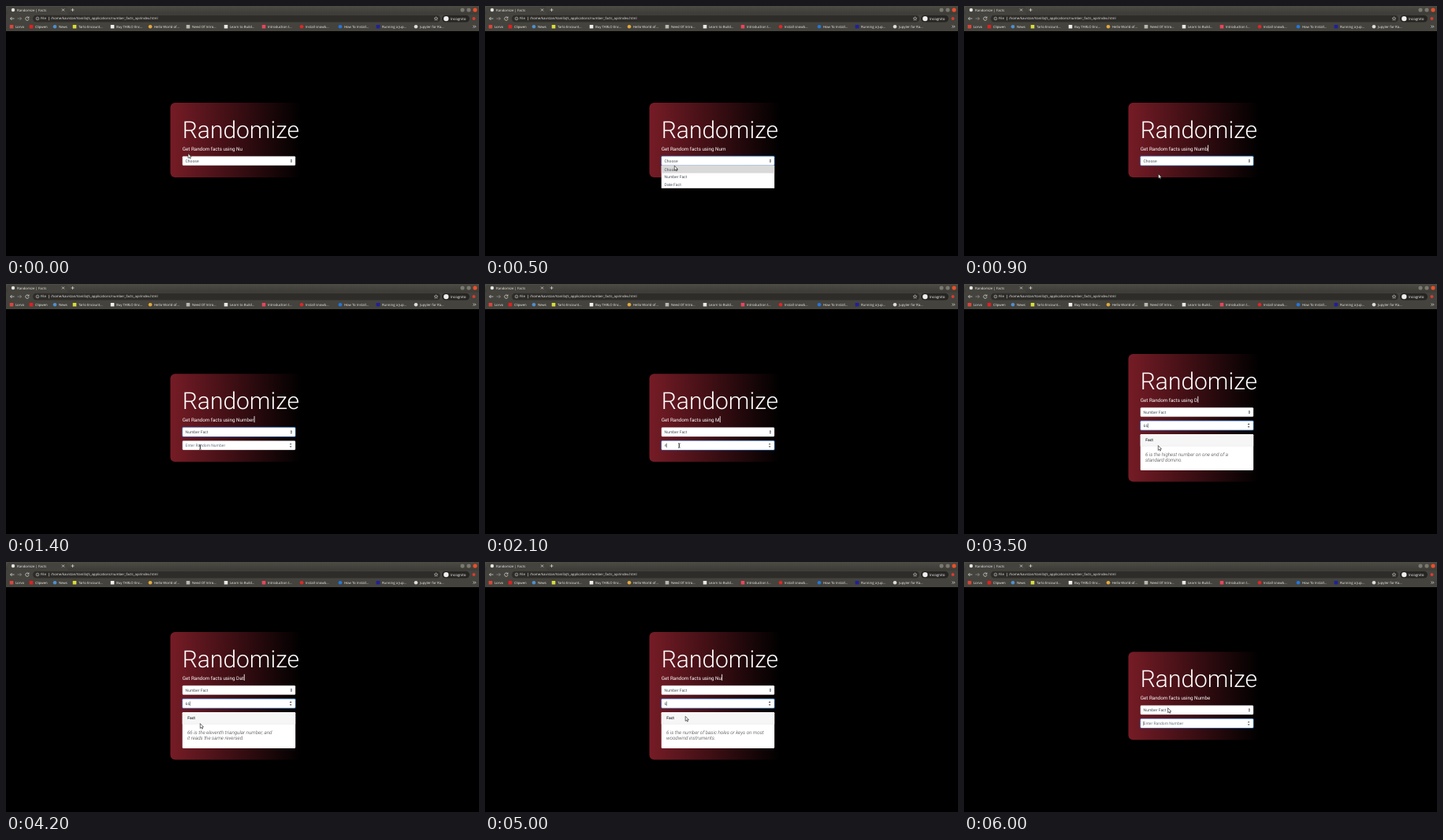
Animation, 600 px wide and 318 px high, one loop 6100 ms. Source, as an HTML page:

```html
<!DOCTYPE html>
<html lang="en">
<head>
<meta charset="utf-8">
<title>Randomize | Facts</title>
<style>
  html, body { margin: 0; width: 100%; height: 100%; overflow: hidden; background: #000; }
  svg { display: block; width: 600px; height: 318px; }
  text { white-space: pre; text-rendering: geometricPrecision; }
  #chrome text { font: 500 4.3px "Open Sans", sans-serif; fill: #efede8; }
  #page text { font: 5px Roboto, sans-serif; fill: #495057; }
  #page .title { font-size: 30px; font-weight: 300; fill: #fff; }
  #page .lead { font-size: 6.25px; fill: #fff; }
  #page .fact { font-size: 6.25px; font-weight: 300; font-style: italic; fill: #333; }
  #page .head { font-weight: 500; fill: #212529; }
  #page .hint { fill: #6c757d; }
  .field { fill: #fff; stroke: #ced4da; stroke-width: .3; }
  .focus .field { stroke: #80bdff; }
  .glow { fill: #007bff; opacity: 0; }
  .focus .glow { opacity: .3; }
  .line { fill: none; stroke: #e6e4de; stroke-width: .7; }
  .thin { stroke-width: .5; }
</style>
</head>
<body>
<svg viewBox="0 0 600 318">
  <defs>
    <linearGradient id="wine">
      <stop stop-color="#761c26"/>
      <stop offset="1"/>
    </linearGradient>
    <linearGradient id="bar" x2="0" y2="1">
      <stop stop-color="#4c4b44"/>
      <stop offset="1" stop-color="#3c3b36"/>
    </linearGradient>
  </defs>
  <rect width="600" height="318"/>

  <g id="chrome">
    <rect width="600" height="11" fill="url(#bar)"/>
    <path d="M0 10.500q2 0 2-2V3q0-2 2-2h72q2 0 2 2v5.500q0 2 2 2h520V32H0z" fill="#44433d"/>
    <circle cx="9" cy="5" r="2.200" fill="#e4e4e2"/>
    <text x="14" y="6.600">Randomize | Facts</text>
    <path class="line" d="M71 3.500l3 3m0-3l-3 3M82.500 5h4m-2-2v4"/>
    <g fill="#7b796f" stroke="#33322e" stroke-width=".5">
      <circle cx="579" cy="5" r="3"/>
      <circle cx="587" cy="5" r="3"/>
      <circle cx="595" cy="5" r="3" fill="#e5512f"/>
    </g>
    <path class="line" d="M10.500 16h-5m2-2l-2 2 2 2"/>
    <path class="line" d="M14.500 16h5m-2-2l2 2-2 2" opacity=".5"/>
    <path class="line" d="M28.600 14.700a2.200 2.200 0 1 0 .5 1.800M29 13.500v1.700h-1.700"/>
    <rect x="34" y="11.800" width="517" height="8.600" rx="4.300" fill="#2d2c29"/>
    <circle class="line thin" cx="40" cy="16" r="1.900"/>
    <path class="line thin" d="M40 15.800v1.200m0-2.200v.4M54.500 13.800v4.500"/>
    <text x="44" y="17.400">File</text>
    <text x="57" y="17.400">/home/kavistan/VanillaJS_applications/number_facts_api/index.html</text>
    <path class="line thin" d="M545.500 13.700l.7 1.600 1.700.1-1.300 1.100.4 1.700-1.500-.9-1.500.9.4-1.700-1.300-1.100 1.700-.1z"/>
    <rect x="553" y="11.800" width="35" height="8.600" rx="4.300" fill="#262522"/>
    <circle cx="558.300" cy="16.100" r="3.200" fill="#eee"/>
    <text x="564" y="17.700" style="font-size:4.500px;fill:#fff">Incognito</text>
    <circle cx="593.500" cy="16" r="2" fill="#d93a32"/>
    <path class="line" d="M592.500 24.700l1.500 1.500-1.500 1.500m2-3l1.500 1.500-1.500 1.500"/>
    <g id="marks"></g>
  </g>

  <g id="page">
    <g id="card">
      <rect id="panel" x="208.500" width="166" rx="6" fill="url(#wine)"/>
      <text class="title" x="223.750" y="45.200">Randomize</text>
      <text id="lead" class="lead" x="223.750" y="60.700"></text>
      <rect id="caret" y="53.800" width="1" height="8" fill="#ddd"/>

      <g id="select">
        <rect class="glow" x="222.800" y="67.100" width="145.300" height="13.700" rx="1.800"/>
        <rect class="field" x="223.900" y="68.150" width="143.100" height="11.600" rx="1.200"/>
        <text id="choice" x="227.600" y="75.800"></text>
        <path d="M360.700 73.500l1.200-1.700 1.200 1.700zm0 1l1.200 1.700 1.200-1.700z" fill="#343a40"/>
      </g>

      <g id="input">
        <rect class="glow" x="222.800" y="84.100" width="145.300" height="13.700" rx="1.800"/>
        <rect class="field" x="223.900" y="85.150" width="143.100" height="11.600" rx="1.200"/>
        <text id="value" x="227.600" y="92.800"></text>
        <rect id="beat" y="88.300" width=".5" height="5.600" fill="#343a40"/>
        <path d="M359.700 89.900l1.400-1.800 1.400 1.800zm0 2l1.400 1.800 1.400-1.800z" fill="#555"/>
      </g>

      <g id="result">
        <rect x="223.750" y="102" width="143.400" height="46" rx="1.200" fill="#fff"/>
        <path d="M223.750 117v-13.800q0-1.200 1.200-1.200h141q1.200 0 1.200 1.200V117z" fill="#f6f6f6"/>
        <path d="M223.750 117.200h143.400" stroke="#dcdcdc" stroke-width=".4"/>
        <text class="head" x="230.300" y="111.400">Fact</text>
        <text id="fact1" class="fact" x="230" y="129.800"></text>
        <text id="fact2" class="fact" x="230" y="137.400"></text>
      </g>

      <g id="menu">
        <rect x="223.750" y="80" width="143.400" height="28.800" fill="#fff"/>
        <rect id="pick" x="223.750" width="143.400" height="9.600" fill="#d9d9d9"/>
        <text x="227.600" y="86.600">Choose</text>
        <text x="227.600" y="96.200">Number Fact</text>
        <text x="227.600" y="105.800">Date Fact</text>
      </g>
    </g>
    <g id="mouse">
      <path id="arrow" d="M0 0v6l1.400-1.200 1 2 .9-.5-.9-1.900h1.800z" fill="#fff" stroke="#111" stroke-width=".6"/>
      <path id="beam" d="M-1.300-2.900q1.300 0 1.300.8v4.200q0 .8-1.300.8M1.300-2.900q-1.300 0-1.300.8v4.200q0 .8 1.300.8" fill="none" stroke="#222" stroke-width=".7"/>
    </g>
  </g>
</svg>

<script>
const LOOP = 6100, TICK = 100, ERASE = 40, BLINK = 6000 / 9;
const $ = id => document.getElementById(id);
const show = (id, on) => { $(id).style.display = on ? '' : 'none'; };
const write = (id, s) => { if ($(id).textContent !== s) $(id).textContent = s; };
// Last entry whose time has been reached
const at = (list, t) => list.filter(e => e[0] <= t).pop();

const marks = [
  [7, '#d9463b', 'Lorvo'], [32, '#e02020', 'Clipwen'], [62, '#4f8fd0', 'News', 1],
  [87, '#d9dc3a', 'Tarlo Encount…'], [135, '#eeeeea', 'Buy TARLO Enc…'],
  [183, '#e2a93c', 'Hello World of…', 1], [231, '#b9b7b0', 'Need Of Intro…'],
  [279, '#e8e8e6', 'Learn to Build…'], [327, '#e8455c', 'Introduction t…'],
  [375, '#e02626', 'Install snowb…', 1], [424, '#2476dc', 'How To Install…', 1],
  [472, '#20209c', 'Running a Jup…'], [520, '#dddddb', 'Jupyter for Ra…', 1]
];
$('marks').innerHTML = marks.map(([x, color, label, round]) =>
  `<rect x="${x - 2.3}" y="23.9" width="4.6" height="4.6" rx="${round ? 2.3 : .5}" fill="${color}"/>
   <text x="${x + 4.9}" y="27.8">${label}</text>`).join('');

// start, word, ms per letter, erase time
const words = [
  [-320, 'Numbers', 320, 1750], [2100, 'Math', 300, 3200],
  [3500, 'Date', 300, 4500], [4700, 'Numbers', 300, 9000]
];
// time, panel top, panel height
const layouts = [[0, 123, 95], [1000, 114.3, 112], [2400, 89, 162.6], [5400, 114.3, 112]];
const values = [[0, ''], [2000, '4'], [2900, ''], [3200, '6'], [3500, '66'], [4400, '6'], [5300, '']];
const facts = [
  [0, '', ''],
  [2400, '4 is the maximal number of horses in one row', 'for carriage.'],
  [3300, '6 is the highest number on one end of a', 'standard domino.'],
  [3700, '66 is the eleventh triangular number, and', 'it reads the same reversed.'],
  [4600, '6 is the number of basic holes or keys on most', 'woodwind instruments.']
];
const path = [
  [0, 231, 187.5], [200, 231, 187.5], [700, 246.5, 213.5], [1100, 246.5, 213.5],
  [1500, 246.3, 205.5], [4500, 246.3, 205.5], [4900, 254.2, 196.3],
  [5400, 254.2, 196.3], [5900, 258.6, 185.7], [LOOP, 258.6, 185.7]
];

function typed(t) {
  const [start, word, step, erase] = at(words, t);
  const n = Math.min(word.length, Math.floor((t - start) / step) + 1);
  const gone = t < erase ? 0 : Math.floor((t - erase) / ERASE) + 1;
  return word.slice(0, Math.max(0, n - gone));
}

function pointer(t) {
  const i = path.findIndex(p => p[0] > t);
  const [t0, x0, y0] = path[i - 1], [t1, x1, y1] = path[i];
  const k = (t - t0) / (t1 - t0);
  return [x0 + (x1 - x0) * k, y0 + (y1 - y0) * k];
}

function draw(t) {
  const [, top, height] = at(layouts, t);
  const picked = t >= 1000, open = t >= 400 && t < 900, focused = t >= 1700;
  const [x, y] = pointer(t);

  $('card').setAttribute('transform', `translate(0 ${top})`);
  $('panel').setAttribute('height', height);

  write('lead', 'Get Random facts using ' + typed(t));
  $('caret').setAttribute('x', 223.75 + $('lead').getComputedTextLength() + .1);
  const phase = t % BLINK;
  show('caret', phase >= 50 && phase < 383);

  write('choice', picked ? 'Number Fact' : 'Choose');
  $('select').setAttribute('class', t >= 400 && !focused ? 'focus' : '');
  show('menu', open);
  $('pick').setAttribute('y', y - top > 89.6 ? 89.6 : 80);

  const value = at(values, t)[1];
  show('input', picked);
  $('input').setAttribute('class', focused ? 'focus' : '');
  write('value', value || 'Enter Random Number');
  $('value').setAttribute('class', value ? '' : 'hint');
  if (picked) {
    $('beat').setAttribute('x', 227.6 + (value ? $('value').getComputedTextLength() : 0));
  }
  show('beat', focused);

  show('result', height > 150);
  const [, line1, line2] = at(facts, t);
  write('fact1', line1);
  write('fact2', line2);

  const beam = picked && t < 2400 && y > 199 && y < 211.5;
  $('mouse').setAttribute('transform', `translate(${x} ${y})`);
  show('arrow', !beam);
  show('beam', beam);
}

const begin = performance.now();
function loop() {
  const t = (performance.now() - begin) % LOOP;
  draw(Math.floor(t / TICK) * TICK);
  requestAnimationFrame(loop);
}
loop();
</script>
</body>
</html>
```
